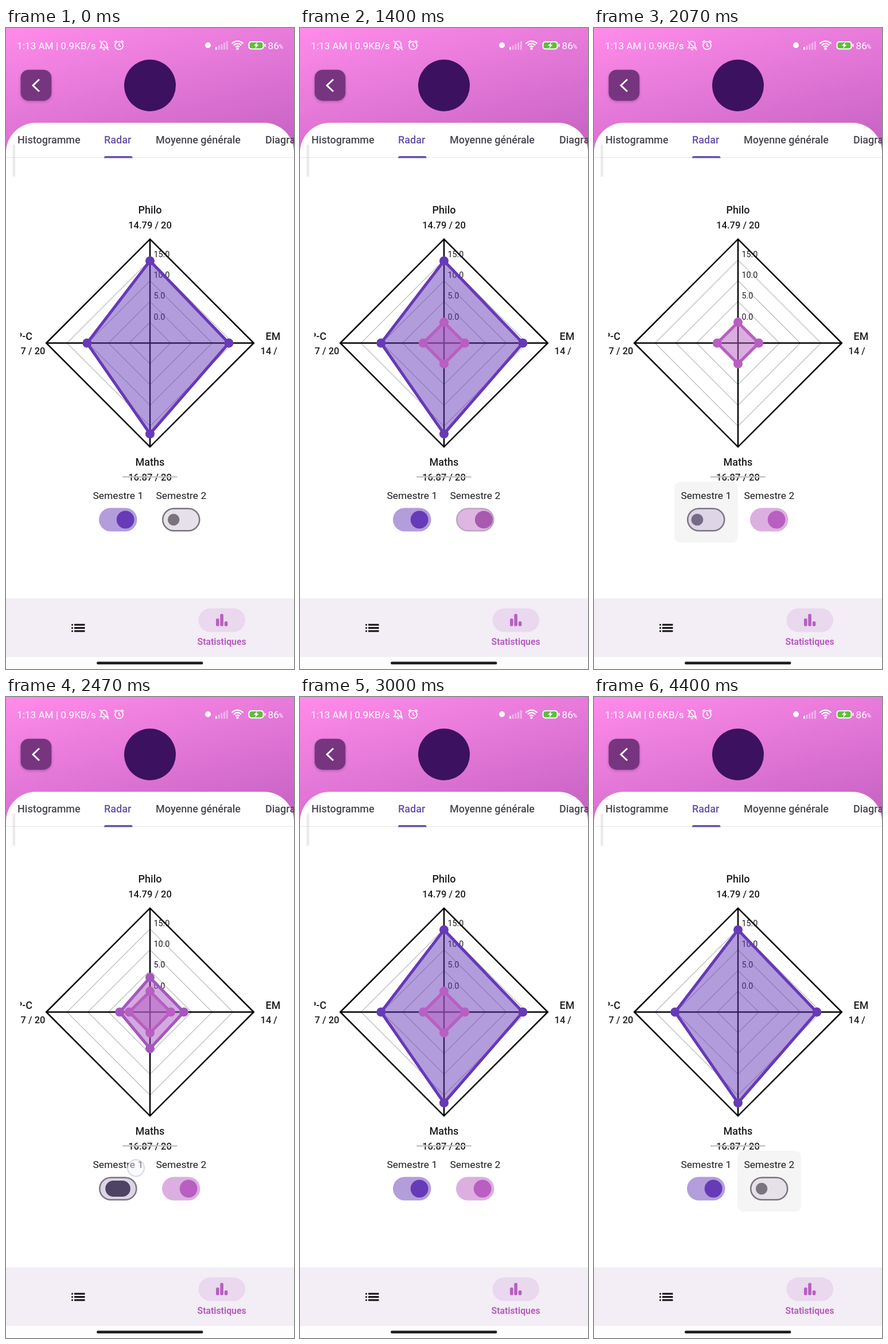
An HTML page with a canvas that plays this animation: 502x1116 px, repeating every 4.47 s.

```html
<!DOCTYPE html>
<html lang="fr">
<head>
<meta charset="utf-8">
<title>Radar</title>
<style>
  html, body { margin: 0; width: 100%; height: 100%; overflow: hidden; background: #fff; }
  canvas { display: block; width: 502px; height: 1116px; }
</style>
</head>
<body>
<canvas id="stage" width="502" height="1116"></canvas>
<script>
const ctx = document.getElementById('stage').getContext('2d');
const LOOP = 4470, FPS = 15;
const PURPLE = [103, 58, 183], PINK = [184, 95, 193];
const GREY = [121, 116, 126], DARK = [73, 69, 79], TRACK = [230, 224, 233];
const CX = 251, CY = 548.5, RING = 36.16;

// Marks in the order top, right, bottom, left.
const TERM1 = [14.79, 14, 16.87, 10.17], TERM2 = [0, 0, 0, 0];

const TAPS = [
  { at: 1200, sw: 1, on: true, x: 305, y: 857 },
  { at: 1866.6, sw: 0, on: false, x: 224, y: 819, card: true },
  { at: 2433, sw: 0, on: true, x: 226.5, y: 820, card: true },
  { at: 3967, sw: 1, on: false, x: 293, y: 822, card: true }
];
const SWITCHES = [
  { x: 195.25, color: PURPLE, on: true },
  { x: 305.25, color: PINK, on: false }
];

const clamp = v => Math.max(0, Math.min(1, v));
const lerp = (a, b, p) => a + (b - a) * p;
const mix = (a, b, p) => a.map((v, i) => lerp(v, b[i], p));
const rgb = (c, a = 1) => `rgba(${c.map(Math.round).join(',')},${a})`;

function bezier(x1, y1, x2, y2) {
  const at = (a, b, u) => 3 * (1 - u) ** 2 * u * a + 3 * (1 - u) * u * u * b + u ** 3;
  return x => {
    if (x <= 0 || x >= 1) return clamp(x);
    let lo = 0, hi = 1;
    for (let i = 0; i < 24; i++) {
      const mid = (lo + hi) / 2;
      if (at(x1, x2, mid) < x) lo = mid; else hi = mid;
    }
    return at(y1, y2, lo);
  };
}
const easeOut = bezier(0, 0, 0.58, 1);
const easeBack = bezier(0.175, 0.885, 0.32, 1.275);
const stretch = bezier(0.31, 0, 0.56, 1);
const settle = bezier(0.2, 0, 0, 1);

function text(str, x, mid, size, { color = '#1d1b20', weight = 400, align = 'left' } = {}) {
  ctx.font = `${weight} ${size}px Roboto, sans-serif`;
  ctx.textAlign = align;
  ctx.fillStyle = color;
  ctx.fillText(str, x, mid + size * 0.355);
}

function box(x, y, w, h, r, fill) {
  ctx.beginPath();
  ctx.roundRect(x, y, w, h, r);
  ctx.fillStyle = fill;
  ctx.fill();
}

function dot(x, y, r, fill) {
  ctx.beginPath();
  ctx.arc(x, y, r, 0, 2 * Math.PI);
  ctx.fillStyle = fill;
  ctx.fill();
}

function line(points, color, width, close) {
  ctx.beginPath();
  points.forEach(([x, y]) => ctx.lineTo(x, y));
  if (close) ctx.closePath();
  ctx.strokeStyle = color;
  ctx.lineWidth = width;
  ctx.stroke();
}

function ring(x, y, r, from = 0, to = 2 * Math.PI, width = 1.7) {
  ctx.beginPath();
  ctx.arc(x, y, r, from, to);
  ctx.strokeStyle = '#fff';
  ctx.lineWidth = width;
  ctx.stroke();
}

const corners = radii => [
  [CX, CY - radii[0]], [CX + radii[1], CY],
  [CX, CY + radii[2]], [CX - radii[3], CY]
];

function header() {
  const g = ctx.createLinearGradient(0, 0, 79, 300);
  g.addColorStop(0, '#ff8bea');
  g.addColorStop(1, '#c864c5');
  ctx.fillStyle = g;
  ctx.fillRect(0, 0, 502, 240);

  ctx.save();
  ctx.shadowColor = 'rgba(60,10,70,.28)';
  ctx.shadowBlur = 5;
  ctx.shadowOffsetY = 2;
  box(25.5, 72.7, 53.8, 54, 14, '#773580');
  ctx.restore();
  line([[58, 89.5], [47, 100], [58, 110.5]], '#fff', 3);
  dot(251, 100, 45, '#3c1160');
}

function statusBar(t) {
  const white = { color: '#fff' };
  text(`1:13 AM | ${t < 3730 ? '0.9' : '0.6'}KB/s`, 19, 30.5, 17.2, white);

  // Muted bell
  ctx.beginPath();
  ctx.moveTo(164, 34.5);
  ctx.lineTo(178, 34.5);
  ctx.lineTo(176, 31.5);
  ctx.lineTo(176, 28);
  ctx.arc(171, 28, 5, 0, Math.PI, true);
  ctx.lineTo(166, 31.5);
  ctx.closePath();
  ctx.strokeStyle = '#fff';
  ctx.lineWidth = 1.6;
  ctx.stroke();
  line([[169, 37.5], [173, 37.5]], '#fff', 1.8);
  line([[163, 22], [179, 38.5]], '#fff', 1.6);

  // Alarm clock
  ring(197, 30.5, 7);
  line([[197, 26.5], [197, 31], [200, 32.5]], '#fff', 1.6);
  line([[189, 25], [193, 21.8]], '#fff', 1.8);
  line([[205, 25], [201, 21.8]], '#fff', 1.8);

  dot(352, 30, 5, '#fff');
  for (let i = 0; i < 5; i++) {
    const h = 5 + i * 2.5;
    box(365 + i * 4.7, 38 - h, 3, h, 1, i ? 'rgba(255,255,255,.42)' : '#fff');
  }
  for (let i = 1; i < 4; i++) ring(403.5, 36, i * 4.4, -Math.PI * 0.77, -Math.PI * 0.23, 2.3);
  dot(403.5, 36, 2.2, '#fff');

  box(422.5, 23, 27, 14.5, 5, '#fff');
  box(424.5, 25, 23, 10.5, 3.5, '#5fbe3a');
  box(450.5, 27.5, 2, 5.5, 1, '#fff');
  ctx.beginPath();
  [[438, 24.5], [432, 31], [435.5, 31], [434, 36], [440.5, 29], [437, 29]]
    .forEach(p => ctx.lineTo(...p));
  ctx.fillStyle = '#fff';
  ctx.fill();
  text('86', 456.5, 30.5, 17.2, white);
  text('%', 475.5, 32.5, 10.5, white);
}

function sheet() {
  box(0, 165, 502, 900, [52, 52, 0, 0], '#fff');
  const tab = { color: '#49454f', weight: 500 };
  text('Histogramme', 20, 195, 18, tab);
  text('Radar', 171, 195, 18, { color: '#6750a4', weight: 500 });
  text('Moyenne générale', 261, 195, 18, tab);
  text('Diagramme', 452, 195, 18, tab);
  ctx.fillStyle = '#e7e5e8';
  ctx.fillRect(0, 225, 502, 1);
  box(171, 223, 49.5, 3.6, [3, 3, 0, 0], '#6750a4');
  box(11.5, 203, 4.5, 56, 1, 'rgba(0,0,0,.08)');
}

function labels() {
  const mid = { weight: 500, align: 'center' }, end = { weight: 500, align: 'right' };
  text('Philo', CX, 317, 18, mid);
  text('14.79 / 20', CX, 343, 16.5, mid);
  text('Maths', CX, 756, 18, mid);
  text('16.87 / 20', CX, 782, 16.5, mid);
  line([[203, 781.5], [298.5, 781.5]], '#c4c2c5', 2.4);
  ctx.save();
  ctx.beginPath();
  ctx.rect(25, 500, 452, 100);
  ctx.clip();
  text('P-C', 46, 537, 18, end);
  text('10.17 / 20', 68.5, 562.5, 16.5, end);
  text('EM', 452.5, 537, 18, { weight: 500 });
  text('14 /', 443.5, 562.5, 16.5, { weight: 500 });
  ctx.restore();
}

function grid() {
  for (let i = 1; i < 5; i++) line(corners(Array(4).fill(i * RING)), '#b9b9b9', 1.2, true);
  const [top, right, bottom, left] = corners(Array(4).fill(5 * RING));
  line([top, bottom], '#000', 2.5);
  line([left, right], '#000', 2.5);
  line([top, right, bottom, left], '#000', 2.5, true);
  for (let i = 0; i < 4; i++) text((i * 5).toFixed(1), 257.5, 502.5 - i * RING, 14.3);
}

function dataset(marks, color) {
  const points = corners(marks.map(m => RING + m * RING / 5));
  line(points, rgb(color), 4.8, true);
  ctx.fillStyle = rgb(color, 0.5);
  ctx.fill();
  line(points, rgb(color), 4.8, true);
  points.forEach(([x, y]) => dot(x, y, 8, rgb(color)));
}

function radar(t) {
  const [show, swap, back, hide] = TAPS.map(tap => tap.at);
  const p = clamp((t - swap) / 150) - clamp((t - back) / 150);
  grid();
  dataset(mix(TERM1, TERM2, p), mix(PURPLE, PINK, p));
  if ((t >= show && t < swap) || (t >= back && t < hide)) dataset(TERM2, PINK);
}

function toggle(index, t) {
  const sw = SWITCHES[index];
  const tap = TAPS.filter(e => e.sw === index && e.at <= t).pop();
  const on = tap ? tap.on : sw.on;
  const p = tap ? clamp((t - tap.at) / 300) : 1;
  const shift = easeBack(p), tint = easeOut(p);
  const pos = on ? shift : 1 - shift, hue = on ? tint : 1 - tint;

  // The thumb stretches to a pill, then settles to its new size.
  const small = [20.5, 20.5], large = [30.8, 30.8], pill = [43.6, 28.2];
  const [from, to] = on ? [small, large] : [large, small];
  const [w, h] = p < 0.11
    ? mix(from, pill, stretch(p / 0.11))
    : mix(pill, to, settle(clamp((p - 0.11) / 0.72)));

  const light = mix(sw.color, [255, 255, 255], 0.5);
  box(sw.x - 33.25, 835.5, 66.5, 41, 20.5, rgb(mix(TRACK, light, hue)));
  if (hue < 1) {
    ctx.beginPath();
    ctx.roundRect(sw.x - 32, 836.75, 64, 38.5, 19.25);
    ctx.strokeStyle = rgb(GREY, 1 - hue * hue);
    ctx.lineWidth = 2.5;
    ctx.stroke();
  }
  const x = sw.x + lerp(-13.1, 12.9, pos);
  box(x - w / 2, 856 - h / 2, w, h, h / 2, rgb(mix(on ? DARK : GREY, sw.color, hue)));
}

function controls(t) {
  for (const tap of TAPS) {
    const age = t - tap.at;
    if (tap.card && age > 100 && (age < 299.9 || tap === TAPS[3])) {
      box(SWITCHES[tap.sw].x - 55, 790, 110.5, 106, 10, `rgba(29,27,32,${0.045 * clamp((age - 60) / 140)})`);
    }
  }
  text('Semestre 1', 195.3, 813.5, 17.4, { align: 'center' });
  text('Semestre 2', 305.3, 813.5, 17.4, { align: 'center' });
  toggle(0, t);
  toggle(1, t);
  for (const tap of TAPS) {
    const age = t - tap.at;
    if (age < -101 || age > 120) continue;
    ctx.globalAlpha = clamp((120 - age) / 100);
    dot(tap.x, tap.y, 14.5, 'rgba(245,243,251,.5)');
    ctx.strokeStyle = 'rgba(205,200,228,.85)';
    ctx.lineWidth = 2;
    ctx.stroke();
    ctx.globalAlpha = 1;
  }
}

function navBar() {
  ctx.fillStyle = '#f3edf5';
  ctx.fillRect(0, 993, 502, 102);
  ctx.fillStyle = '#fdfdfd';
  ctx.fillRect(0, 1095, 502, 21);
  for (const y of [1039, 1044.5, 1050]) {
    dot(115.5, y, 1.6, '#111');
    box(119, y - 1.4, 18.5, 2.8, 0.5, '#111');
  }
  box(335.5, 1010.5, 81.5, 41, 20.5, '#e9d8ee');
  for (const [x, y] of [[366, 1028], [373.3, 1020], [380.8, 1033]]) {
    box(x, y, 5.6, 1041.5 - y, 2.5, rgb(PINK));
  }
  text('Statistiques', 376, 1068.5, 15.8, { color: rgb(PINK), weight: 700, align: 'center' });
  box(158, 1103.3, 185.5, 4.8, 2.4, '#202020');
}

function draw(t) {
  ctx.fillStyle = '#fff';
  ctx.fillRect(0, 0, 502, 1116);
  header();
  statusBar(t);
  sheet();
  labels();
  radar(t);
  controls(t);
  navBar();
}

const start = performance.now();
function tick() {
  const t = (performance.now() - start) % LOOP;
  draw(Math.floor((t + 4) * FPS / 1000) * 1000 / FPS);
  requestAnimationFrame(tick);
}
tick();
</script>
</body>
</html>
```
